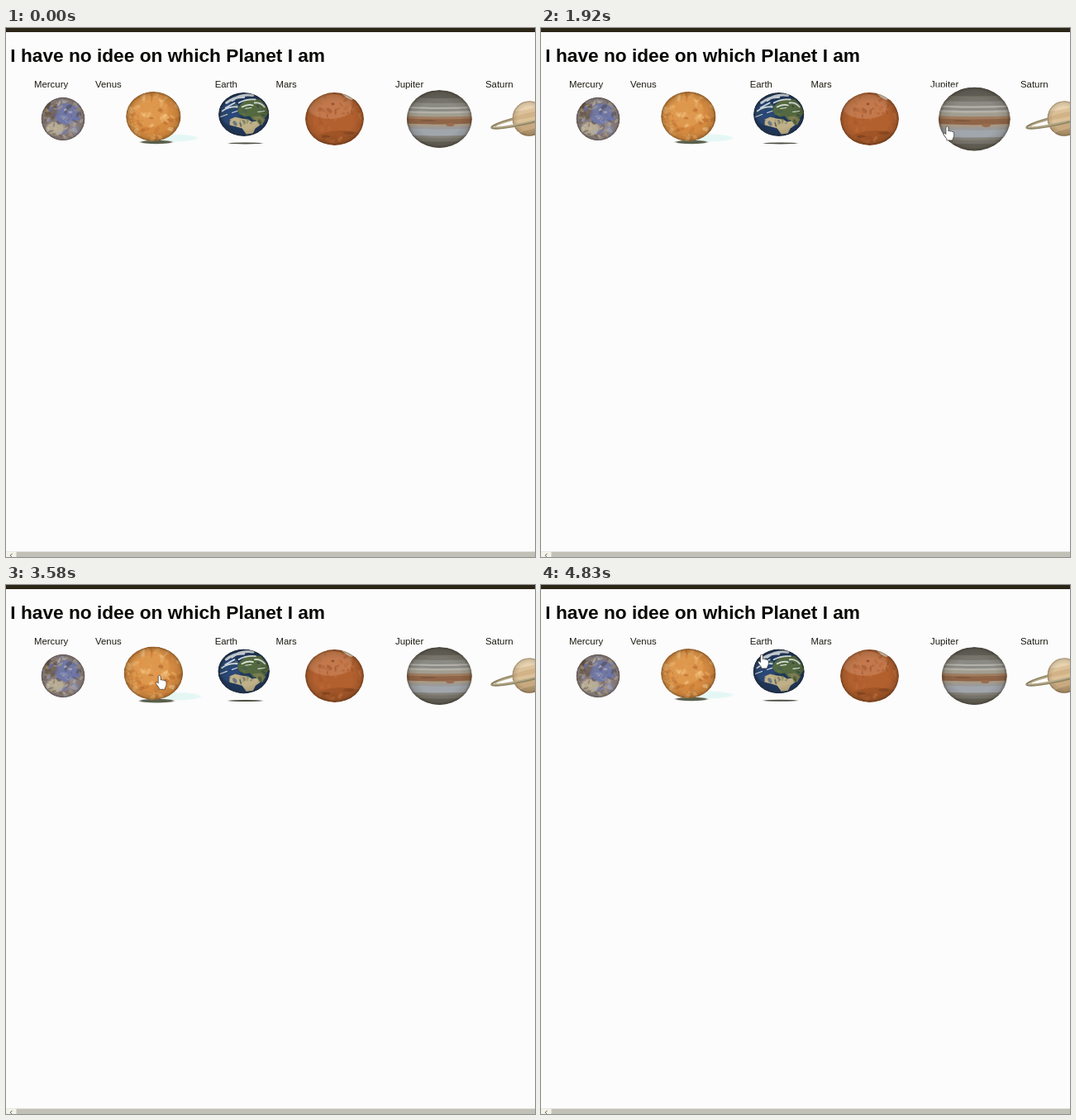
Recreate the animation shown at these times as an HTML page. Size 640 by 640 pixels, loop 4910 ms.

```html
<!DOCTYPE html>
<html lang="en">
<head>
<meta charset="utf-8">
<title>Planets</title>
<style>
  html, body { margin: 0; width: 100%; height: 100%; overflow: hidden; background: #fcfcfd; }
  svg { display: block; width: 100vw; height: 100vh; }
  text { font-family: Arial, "Liberation Sans", sans-serif; font-size: 11.4px; fill: #1c1a10; }
  text.title { font-size: 22.7px; font-weight: bold; fill: #080804; }
</style>
</head>
<body>
<svg id="stage" viewBox="0 0 640 640"></svg>
<script>
const LOOP = 4910, FPS = 12, EASE_MS = 500, GROW = 0.1;
const IMG_Y = 75, IMG_H = 70, MID_Y = 110, PAGE = '#fcfcfd';

let seed = 7;
const rnd = () => (seed = (seed * 16807) % 2147483647) / 2147483647;
const pick = list => list[Math.floor(rnd() * list.length)];
const ell = (x, y, rx, ry, fill, more = '') =>
  `<ellipse cx="${x}" cy="${y}" rx="${rx}" ry="${ry}" fill="${fill}" ${more}/>`;
const shape = (d, fill, more = '') => `<path d="${d}" fill="${fill}" ${more}/>`;

// Random soft patches scattered over a disc.
function patches(n, rx, ry, size, colors) {
  let s = '';
  for (let i = 0; i < n; i++) {
    const a = rnd() * 6.283, r = Math.sqrt(rnd());
    const x = (Math.cos(a) * r * rx).toFixed(1), y = (Math.sin(a) * r * ry).toFixed(1);
    const w = size * (0.4 + rnd()), h = w * (0.25 + rnd() * 0.4);
    s += ell(x, y, w.toFixed(1), h.toFixed(1), pick(colors),
      `opacity="${(0.25 + rnd() * 0.35).toFixed(2)}" transform="rotate(${Math.round(rnd() * 180)} ${x} ${y})"`);
  }
  return s;
}

// A shaded ball with surface detail clipped to its outline.
function ball(id, x, y, rx, ry, base, detail) {
  return `<g transform="translate(${x} ${y})">
    <clipPath id="${id}">${ell(0, 0, rx, ry, '#000')}</clipPath>
    <g clip-path="url(#${id})">${ell(0, 0, rx, ry, base)}${detail}
    ${ell(0, 0, rx, ry, 'url(#shade)')}</g></g>`;
}

function mercury() {
  return ball('mercury', 0, 0, 26.5, 26.3, '#8b8080',
    ell(4, -6, 15, 13, '#6273bd', 'opacity=".6" filter="url(#soft)"') +
    ell(-15, -9, 8, 10, '#6e583c', 'opacity=".6" filter="url(#soft)"') +
    ell(-9, 12, 11, 8, '#cfc3a0', 'opacity=".65" filter="url(#soft)"') +
    ell(13, 14, 7, 6, '#8c8fb4', 'opacity=".5" filter="url(#soft)"') +
    patches(90, 25, 25, 3.2, ['#dcd4bc', '#665440', '#5a6cc4', '#a3aacb', '#4e4850', '#bfa97c']));
}

function venus() {
  return ell(22, 23, 32, 4.5, '#dcf6f1', 'opacity=".7" filter="url(#soft)"') +
    ell(4, 28, 19, 2.2, '#5a5e4c', 'filter="url(#soft)"') +
    ball('venus', 0.3, -3, 33.2, 30, '#d58a40',
      ell(-4, -6, 22, 19, '#e7a65c', 'opacity=".5" filter="url(#soft)"') +
      patches(100, 32, 29, 4, ['#f0bd78', '#e6a35a', '#bb6a2a', '#f4cb8e', '#b5662b', '#dc9148']));
}

function earth() {
  return ell(2, 29.4, 20, 1, '#4c4c40', 'filter="url(#soft)"') +
    ball('earth', 0, -5.5, 30.7, 26.5, '#20375c',
      ell(-16, -1, 12, 14, '#2d5084', 'opacity=".7" filter="url(#soft)"') +
      shape('M-4-12L2-17 8-19 20-18 27-10 30-2 25 5 17 4 12 8 7 2 1 3-5 0-8-5Z', '#54693f') +
      shape('M-17 6L-10 3-3 5 5 6 10 9 16 8 21 12 14 17 11 23 3 24-2 17-9 15-17 13Z', '#bfb087') +
      shape('M10 3L19 2 26 6 22 13 16 9Z', '#7d7d52') +
      patches(30, 26, 14, 2.6, ['#31502c', '#6c8146', '#1a2c4a', '#2d4d80']) +
      '<g stroke="#eef3f5" fill="none" stroke-linecap="round" opacity=".85">' +
      '<path d="M-21-14Q-11-22 0-21M-14-17Q-4-25 11-23" stroke-width="3"/>' +
      '<path d="M-26-4Q-18-10-8-9M-6-14Q3-19 14-18M13-14Q20-15 25-9M-22-8L-11-14M-2-9Q5-13 11-11" stroke-width="1.8"/>' +
      '<path d="M-28 3L-20 0M2-7L9-8M17-3L25-4M-14-2L-8-4" stroke-width="1.1"/></g>');
}

function mars() {
  return ball('mars', 0, 0, 35.5, 32, '#b3602f',
    ell(-5, -15, 28, 15, '#c98258', 'opacity=".75" filter="url(#soft)"') +
    ell(8, 23, 28, 9, '#924d22', 'opacity=".55" filter="url(#soft)"') +
    patches(60, 34, 30, 3.6, ['#c67640', '#a65628', '#bb6938', '#985026']) +
    shape('M7-32L20-31 26-25 20-23 14-26Z', '#f0e4d2', 'opacity=".9"') +
    ell(-2, -18, 2, 1.4, '#6e3d20', 'opacity=".6"') + ell(-10, 21, 5, 1.6, '#6e371a', 'opacity=".5"') +
    ell(17, 17, 7, 2, '#79401f', 'opacity=".5"'));
}

function jupiter() {
  const bands = [[-35, 9, '#626058'], [-26, 6, '#77756c'], [-20, 5, '#8b8a84'], [-15, 2, '#b4b3ab'],
    [-13, 3, '#8c8b86'], [-10, 2.5, '#b3b1a8'], [-7.5, 4, '#a29d90'], [-3.5, 3, '#a07c5f'],
    [-0.5, 6, '#8f6447'], [5.5, 3, '#a89a88'], [8.5, 3, '#9b9a98'], [11.5, 8, '#a1a6ad'],
    [19.5, 3, '#85827b'], [22.5, 4, '#79766d'], [26.5, 9, '#656259']];
  const rows = bands.map(([y, h, c]) =>
    shape(`M-40 ${y}Q0 ${y + 2} 40 ${y}V${y + h + 1}Q0 ${y + h + 3}-40 ${y + h + 1}Z`, c)).join('');
  return ball('jupiter', 0.3, 0, 39.4, 35, '#75736b', rows +
    ell(13, 7, 5, 2, '#9a6c50') + ell(-14, 2, 10, 1, '#75503a', 'opacity=".6"'));
}

function saturn() {
  const ring = (rx, ry, w, c, half) =>
    `<path d="M${-rx} 0A${rx} ${ry} 0 0 ${half} ${rx} 0" fill="none" stroke="${c}" stroke-width="${w}"/>`;
  const rings = half => `<g transform="rotate(-13)">${ring(46.3, 5, 2.4, '#8d8262', half)}${ring(41.5, 3.7, 1.6, '#b3a684', half)}</g>`;
  const body = ball('saturn', 0.5, -0.5, 20.6, 21.3, '#dcc199',
    '<g transform="rotate(-13)">' + ell(0, -17, 22, 6, '#e8d3b0') + ell(0, -4, 24, 3, '#d2b388') +
    ell(0, 10, 24, 4, '#c9aa80') + ell(0, 18, 22, 5, '#b3976f') + '</g>');
  return rings(1) + body + rings(0);
}

// name, left edge, image width, drawing
const planets = [
  ['Mercury', 34, 70, mercury], ['Venus', 108, 140, venus], ['Earth', 252.7, 70, earth],
  ['Mars', 326.5, 142, mars], ['Jupiter', 471, 106, jupiter], ['Saturn', 580, 105, saturn]
].map(([name, x, w, draw]) => ({ name, x, w, draw, mid: x + w / 2, spans: [] }));

// Pointer tip: time, x, y
const route = [
  [0, 800, 118], [560, 730, 118], [680, 684, 116], [830, 630, 113], [1920, 491, 119],
  [2190, 471, 117], [2240, 467, 116], [2580, 396, 112.5], [2975, 326, 113], [3060, 322, 113],
  [3170, 294, 114], [3880, 108, 106], [3925, 104, 105], [4080, 77, 104], [4200, 66, 106],
  [4330, 72, 74], [4500, 150, 66], [4740, 252, 70], [4833, 267, 84], [5000, 290, 100]
];

function pointer(t) {
  const i = Math.max(1, route.findIndex(k => k[0] > t));
  const [t0, x0, y0] = route[i - 1], [t1, x1, y1] = route[i];
  const f = (t - t0) / (t1 - t0);
  return [x0 + (x1 - x0) * f, y0 + (y1 - y0) * f];
}

const over = (p, x, y) => x >= p.x && x < p.x + p.w && y >= IMG_Y && y < IMG_Y + IMG_H;

// Hover spans follow from the pointer route.
for (let t = 0; t < LOOP; t += 5) {
  const [x, y] = pointer(t);
  for (const p of planets) {
    const last = p.spans[p.spans.length - 1], open = last && last[1] === Infinity;
    if (over(p, x, y)) { if (!open) p.spans.push([t, Infinity]); }
    else if (open) last[1] = t;
  }
}

// CSS "ease" curve
function ease(x) {
  if (x <= 0) return 0;
  if (x >= 1) return 1;
  const curve = (u, a, b) => 3 * u * (1 - u) ** 2 * a + 3 * u * u * (1 - u) * b + u ** 3;
  let lo = 0, hi = 1;
  for (let i = 0; i < 20; i++) {
    const m = (lo + hi) / 2;
    if (curve(m, 0.25, 0.25) < x) lo = m; else hi = m;
  }
  return curve(lo, 0.1, 1);
}

const scaleAt = (p, t) => 1 + GROW * p.spans.reduce(
  (s, [a, b]) => s + ease((t - a) / EASE_MS) - ease((t - b) / EASE_MS), 0);

const stage = document.getElementById('stage');
stage.innerHTML = `
  <defs>
    <radialGradient id="shade">
      <stop offset=".65" stop-color="#1d1608" stop-opacity="0"/>
      <stop offset=".9" stop-color="#1d1608" stop-opacity=".12"/>
      <stop offset="1" stop-color="#1d1608" stop-opacity=".42"/>
    </radialGradient>
    <filter id="soft" x="-50%" y="-100%" width="200%" height="300%"><feGaussianBlur stdDeviation="1.6 .7"/></filter>
  </defs>
  <rect width="640" height="640" fill="${PAGE}"/>
  <rect width="640" height="5" fill="#2b2618"/>
  <text class="title" x="5.3" y="41">I have no idee on which Planet I am</text>
  ${planets.map(p => `<text x="${p.x}" y="72">${p.name}</text>`).join('')}
  ${planets.map(p => `<g class="planet"><rect x="${-p.w / 2}" y="${-IMG_H / 2}" width="${p.w}" height="${IMG_H}" fill="${PAGE}"/>${p.draw()}</g>`).join('')}
  <rect y="633.5" width="640" height="6.5" fill="#c1c1b8"/>
  <rect y="633.5" width="12.5" height="6.5" fill="#f3f3ea"/>
  <path d="M7.5 635.8L5.2 638.2 7.5 640.6" fill="none" stroke="#5c5a4c"/>
  <g id="cursor" stroke="#2a2418" stroke-width=".7" stroke-linejoin="round">
    <path id="hand" fill="#fff" transform="scale(.94)" d="M-1.6 1Q0-1 1.6 1V6Q3.2 5 4.2 6.4 5.6 5.6 6.6 7 8.6 6.6 8.8 8.6V12Q8.6 14.5 7.2 16V18H-.6V16.2L-4.6 10.6Q-5.2 8.6-3.4 8.6L-1.6 10.2Z"/>
    <path id="arrow" fill="#fff" d="M0 0V15L3.5 11.8 5.8 17 8 16 5.8 11H10.4Z"/>
  </g>`;

const nodes = stage.querySelectorAll('.planet');
const [cursor, hand, arrow] = ['cursor', 'hand', 'arrow'].map(id => document.getElementById(id));

function render(ms) {
  const t = Math.floor((ms % LOOP + 3.4) * FPS / 1000) * 1000 / FPS;
  planets.forEach((p, i) =>
    nodes[i].setAttribute('transform', `translate(${p.mid} ${MID_Y}) scale(${scaleAt(p, t).toFixed(4)})`));
  const [x, y] = pointer(t), hot = planets.some(p => over(p, x, y));
  cursor.setAttribute('transform', `translate(${x.toFixed(1)} ${y.toFixed(1)})`);
  hand.style.display = hot ? '' : 'none';
  arrow.style.display = hot ? 'none' : '';
}

let start;
function tick(now) {
  if (start === undefined) start = now;
  render(now - start);
  requestAnimationFrame(tick);
}
render(0);
requestAnimationFrame(tick);
</script>
</body>
</html>
```
